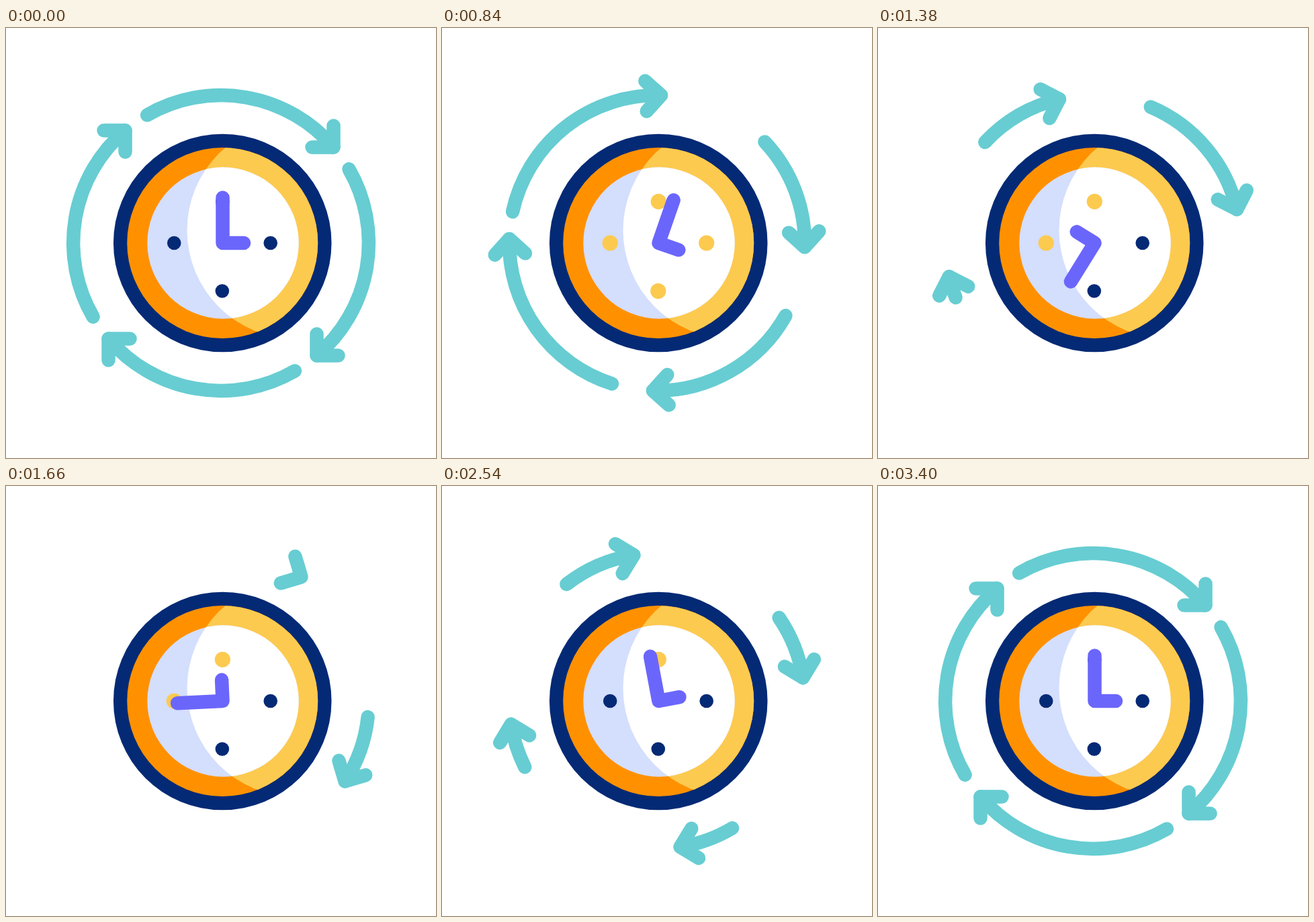
These frames come from a looping animation (640 by 640 pixels, 3600 ms). An HTML page with a canvas:

```html
<!DOCTYPE html>
<html lang="en">
<head>
<meta charset="utf-8">
<title>Clock cycle</title>
<style>
  html, body { margin: 0; width: 100%; height: 100%; overflow: hidden; background: #fff; }
  canvas { display: block; }
</style>
</head>
<body>
<canvas id="stage" width="640" height="640"></canvas>
<script>
const ctx = document.getElementById('stage').getContext('2d');
const LOOP = 3600, RAD = Math.PI / 180;
const NAVY = [4, 42, 117], YELLOW = [253, 202, 80];
const TEAL = '#67cdd2', PURPLE = '#6b66fb';

const clamp = x => Math.min(1, Math.max(0, x));
const span = (t, start, length) => clamp((t - start) / length);
const smooth = u => u * u * (3 - 2 * u);
const mix = (a, b, k) => a + (b - a) * k;
const rgb = c => `rgb(${c.map(Math.round)})`;

// Cubic bezier easing with control points (x1, 0) and (x2, 1).
function bezier(u, x1, x2) {
  let lo = 0, hi = 1;
  for (let i = 0; i < 24; i++) {
    const s = (lo + hi) / 2, r = 1 - s;
    if (3 * r * r * s * x1 + 3 * r * s * s * x2 + s * s * s < u) lo = s;
    else hi = s;
  }
  return smooth(lo);
}

function disc(x, y, r, color) {
  ctx.fillStyle = color;
  ctx.beginPath();
  ctx.arc(x, y, r, 0, 2 * Math.PI);
  ctx.fill();
}

// Strokes the first part of a two-legged line whose legs are equally long.
function elbow([a, b, c], part) {
  const point = (p, q, k) => [mix(p[0], q[0], k), mix(p[1], q[1], k)];
  ctx.beginPath();
  ctx.moveTo(...a);
  ctx.lineTo(...point(a, b, clamp(part * 2)));
  if (part > 0.5) ctx.lineTo(...point(b, c, part * 2 - 1));
  ctx.stroke();
}

const TAIL = -30, TIP = 49.6;
const HEAD = [[167.5, -174.5], [167.5, -142.5], [135.5, -142.5]];

function arrow(i, t) {
  const returning = t > 2090;
  const headStart = 2140 + 15 * i;
  const gone = 1275 + 250 * i;
  const head = returning ? smooth(span(t, headStart, 320)) : +(t < gone);
  const growStart = 2380 + 25 * i;
  const line = returning
    ? 1 - (1 - span(t, growStart, 3400 - growStart)) ** 2.6
    : 1 - span(t, 150 + 215 * i, 1080) ** 1.85;

  ctx.save();
  ctx.rotate(i * 90 * RAD);
  if (line > 0) {
    ctx.beginPath();
    ctx.arc(0, 0, 219.9, (mix(TIP, TAIL, line) - 90) * RAD, (TIP - 90) * RAD);
    ctx.stroke();
  }
  if (head > 0) elbow(i ? HEAD : [...HEAD].reverse(), head);
  ctx.restore();
}

function face() {
  disc(322.2, 320, 162.3, rgb(NAVY));
  const layers = [[142, rgb(YELLOW), '#ff9100'], [112.7, '#fff', '#d4defd']];
  for (const [r, light, shade] of layers) {
    const x = r > 120 ? 322.2 : 323;
    disc(x, 320, r, shade);
    ctx.save();
    ctx.beginPath();
    ctx.arc(431, 301, 161.5, 0, 2 * Math.PI);
    ctx.clip();
    disc(x, 320, r, light);
    ctx.restore();
  }
}

const DOTS = [[393.7, 320, 90], [321.8, 391.5, 180], [250.2, 320, 270], [322.3, 258.3, 359.9]];

function draw(t) {
  ctx.fillStyle = '#fff';
  ctx.fillRect(0, 0, 640, 640);
  ctx.lineCap = ctx.lineJoin = 'round';
  ctx.lineWidth = 20.5;

  ctx.save();
  ctx.strokeStyle = TEAL;
  ctx.translate(320, 320);
  ctx.rotate(360 * smooth(span(t, 160, 3200)) * RAD);
  for (let i = 0; i < 4; i++) arrow(i, t);
  ctx.restore();

  face();

  // Dots light up before the hand starts and go dark as it passes.
  const angle = 360 * bezier(span(t, 760, 2330), 0.077, 0.161);
  for (const [x, y, at] of DOTS) {
    const lit = span(t, 400, 160) * (1 - clamp((angle - at) / (at > 300 ? 0.1 : 12)));
    disc(x, y, mix(10.3, 11.6, lit), rgb(NAVY.map((c, k) => mix(c, YELLOW[k], lit))));
  }

  ctx.save();
  ctx.strokeStyle = PURPLE;
  ctx.translate(322.5, 320);
  ctx.rotate(angle * RAD);
  ctx.beginPath();
  ctx.moveTo(0, -67.5);
  ctx.lineTo(0, 0);
  ctx.lineTo(31.5, 0);
  ctx.stroke();
  ctx.restore();
}

function tick() {
  draw(performance.now() % LOOP);
  requestAnimationFrame(tick);
}
tick();
</script>
</body>
</html>
```
